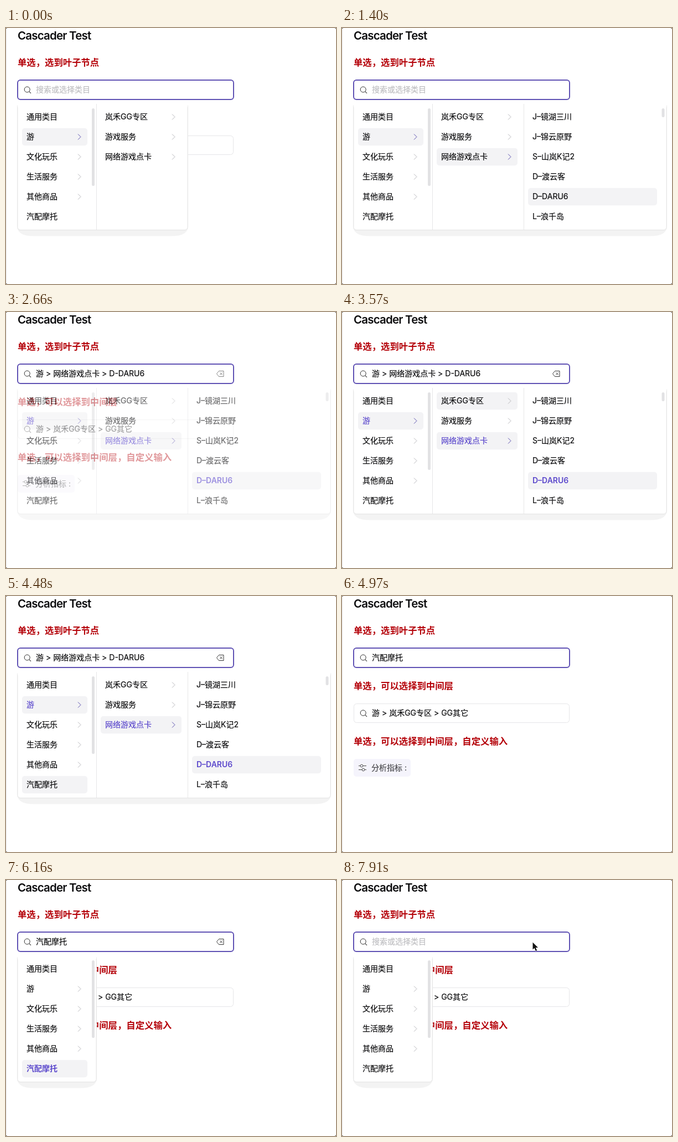
An HTML page for the animation above (8000 ms loop, 596 by 462 pixels).

```html
<!DOCTYPE html>
<html lang="zh">
<head>
<meta charset="utf-8">
<title>Cascader Test</title>
<style>
  html, body { margin: 0; width: 100%; height: 100%; overflow: hidden; background: #444; }
  svg { display: block; width: 596px; height: 462px; }
  text { font: 14px Inter, "Noto Sans CJK SC", "Noto Sans CJK", sans-serif; white-space: pre; stroke-width: .2px; }
  .title { font-size: 20.5px; font-weight: 600; letter-spacing: -.8px; stroke: none; }
  .heading { font-size: 16.38px; font-weight: 600; fill: #b40008; stroke: none; }
  .selected { font-weight: 600; stroke: none; }
</style>
</head>
<body>
<svg id="stage" viewBox="0 0 596 462"></svg>
<script>
const stage = document.getElementById('stage');
const LOOP = 8000, STEP = 70;
const ACCENT = '#5b48cc', FOCUS = [96, 82, 180], GREY = [172, 172, 174];
const INK = '#0c0c0e', FILL = '#f3f3f5', LINE = '#e6e6e8';

const columns = [
  { x: 29, w: 118, edge: 163, arrow: 130, bar: [155, 140],
    rows: ['通用类目', '游', '文化玩乐', '生活服务', '其他商品', '汽配摩托'], parents: [1, 2, 3, 4] },
  { x: 171, w: 146, edge: 328, arrow: 300,
    rows: ['岚禾GG专区', '游戏服务', '网络游戏点卡'], parents: [0, 1, 2] },
  { x: 336, w: 233, edge: 586, bar: [577.5, 16],
    rows: ['J–镜湖三川', 'J–锦云原野', 'S–山岚K记2', 'D–渡云客', 'D–DARU6', 'L–浪千岛'], parents: [] },
];
const PATH = [1, 2, 4];

// [time, column, row] under the pointer
const hovers = [
  [0, -1, -1], [210, 1, 2], [490, -1, -1], [770, 2, 2], [1120, 2, 3], [1400, 2, 4], [1680, -1, -1],
  [3570, 1, 0], [3640, 1, 1], [3710, 0, 1], [3850, 0, 2], [4060, 0, 3], [4340, 0, 4], [4480, 0, 5], [4970, -1, -1],
];

const text = (x, y, s, fill = INK, cls = '') =>
  `<text x="${x}" y="${y}" fill="${fill}" stroke="${fill}" class="${cls}">${s.replace(/>/g, '&gt;')}</text>`;
const rect = (x, y, w, h, r, fill, more = '') => `<rect x="${x}" y="${y}" width="${w}" height="${h}" rx="${r}" fill="${fill}" ${more}/>`;
const path = (d, stroke, width = 1, more = '') => `<path d="${d}" fill="none" stroke="${stroke}" stroke-width="${width}" ${more}/>`;
const clamp = v => Math.max(0, Math.min(1, v));

// The border sits inside the box; a wider one grows outwards.
function field(y, stroke, width, value) {
  const inset = 1 - width / 2;
  return rect(21 + inset, y + inset, 390 - 2 * inset, 35 - 2 * inset, 5, '#fff', `stroke="${stroke}" stroke-width="${width}"`)
    + `<circle cx="38.2" cy="${y + 17}" r="5" fill="none" stroke="#333"/>`
    + path(`M41.8 ${y + 20.6}l3.2 3.2`, '#333', 1.1)
    + text(54, y + 22, value || '搜索或选择类目', value ? INK : '#bdbdc0');
}

function row(col, i, { active, selected, hovered, leaf }) {
  const y = 145 + 36 * i;
  let out = active || hovered ? rect(col.x, y - .2, col.w, 31.5, 5, FILL) : '';
  out += text(col.x + 8, y + 20, col.rows[i], selected ? ACCENT : INK, selected && leaf ? 'selected' : '');
  if (col.parents.includes(i))
    out += path(`M${col.arrow} ${y + 10.5}l5 5-5 5`, active ? '#5a4fae' : '#b8b8bc');
  return out;
}

function panel(t, chosen, opacity) {
  const count = t < 490 ? 2 : t < 4970 ? 3 : 1;
  const [, hoverCol, hoverRow] = hovers.findLast(h => h[0] <= t);
  const right = columns[count - 1].edge;
  const trail = count === 1 ? (chosen ? [5] : []) : PATH;
  let out = `<g opacity="${opacity}">`
    + path(`M20 139V356Q19 375.500 50 375.500H${right - 29}Q${right + 2} 375.500 ${right + 1} 356V139Z`, 'none', 0, 'style="fill:#f3f3f3"')
    + rect(21, 137, right - 21, 227.5, 5, '#fff', 'stroke="#000" stroke-opacity=".09"')
    + rect(21, 134, right - 21, 12, 5, '#fff');
  columns.slice(0, count).forEach((col, c) => {
    col.rows.forEach((_, i) => {
      const active = trail[c] === i && (c < count - 1 || !!chosen);
      out += row(col, i, {
        active, selected: active && !!chosen, leaf: c === count - 1,
        hovered: c === hoverCol && i === hoverRow,
      });
    });
    if (c < count - 1) out += path(`M${col.edge + .5} 137V364`, LINE);
    if (col.bar) out += rect(col.bar[0], 145, 5, col.bar[1], 2.5, '#e2e2e4');
  });
  return out + '</g>';
}

function borderColor(t) {
  const blur = t < 2520 ? clamp((t - 2030) / 210) : t >= 5670 && t < 5950 ? clamp((t - 5600) / 140) : 0;
  return { blur, color: `rgb(${FOCUS.map((v, i) => Math.round(v + (GREY[i] - v) * blur))})` };
}

const pointer = (x, y) => path('M0 0v13l3-2.800 2.300 5.300 2.300-1-2.300-5h4.200z', '#fff', 1.2,
  `transform="translate(${x} ${y})" style="fill:#111;paint-order:stroke"`);

function draw(t) {
  const chosen = t < 1680 ? '' : t < 4970 ? '游 > 网络游戏点卡 > D-DARU6' : t < 7280 ? '汽配摩托' : '';
  const opacity = t < 1680 ? 1 : t < 2520 ? 0 : t < 4970 ? clamp((t - 2450) / 350)
    : t < 5950 ? 0 : clamp((t - 5880) / 280);
  const { blur, color } = borderColor(t);

  let out = rect(0, 0, 596, 462, 3, '#fff') + path('M.5 3V459', '#e9e9eb')
    + text(21, 20.5, 'Cascader Test', INK, 'title')
    + text(21, 68, '单选，选到叶子节点', INK, 'heading')
    + text(21, 168, '单选，可以选择到中间层', INK, 'heading')
    + text(21, 267.5, '单选，可以选择到中间层，自定义输入', INK, 'heading')
    + field(94, color, 2 - blur, chosen)
    + field(194, LINE, 1, '游 > 岚禾GG专区 > GG其它')
    + rect(21, 294, 103, 32, 5, '#f5f4fc')
    + path('M30 306.500h3m5 0h6M30 313.500h6m5 0h3', '#444')
    + '<g fill="none" stroke="#444"><circle cx="35.5" cy="306.500" r="2.300"/><circle cx="38.500" cy="313.500" r="2.300"/></g>'
    + text(53, 315, '分析指标 :', '#48484c');

  if (opacity && chosen)
    out += path('M380.500 111.500l4-5h8.500v10h-8.500zM386.300 109.200l4.400 4.600m0-4.600l-4.400 4.600', '#333', 1, `opacity="${opacity}"`);
  if (opacity) out += panel(t, chosen, opacity);
  if (t >= 7350 && t < 7910) out += rect(54, 103, 1.2, 17, 0, '#222');
  if (t >= 3080 && t < 3360) out += pointer(271.5, 112);
  if (t >= 7350) out += pointer(344.5, 112.5);
  stage.innerHTML = out;
}

let shown = -1;
function tick() {
  const t = Math.floor(performance.now() % LOOP / STEP) * STEP;
  if (t !== shown) draw(shown = t);
  requestAnimationFrame(tick);
}
tick();
</script>
</body>
</html>
```
